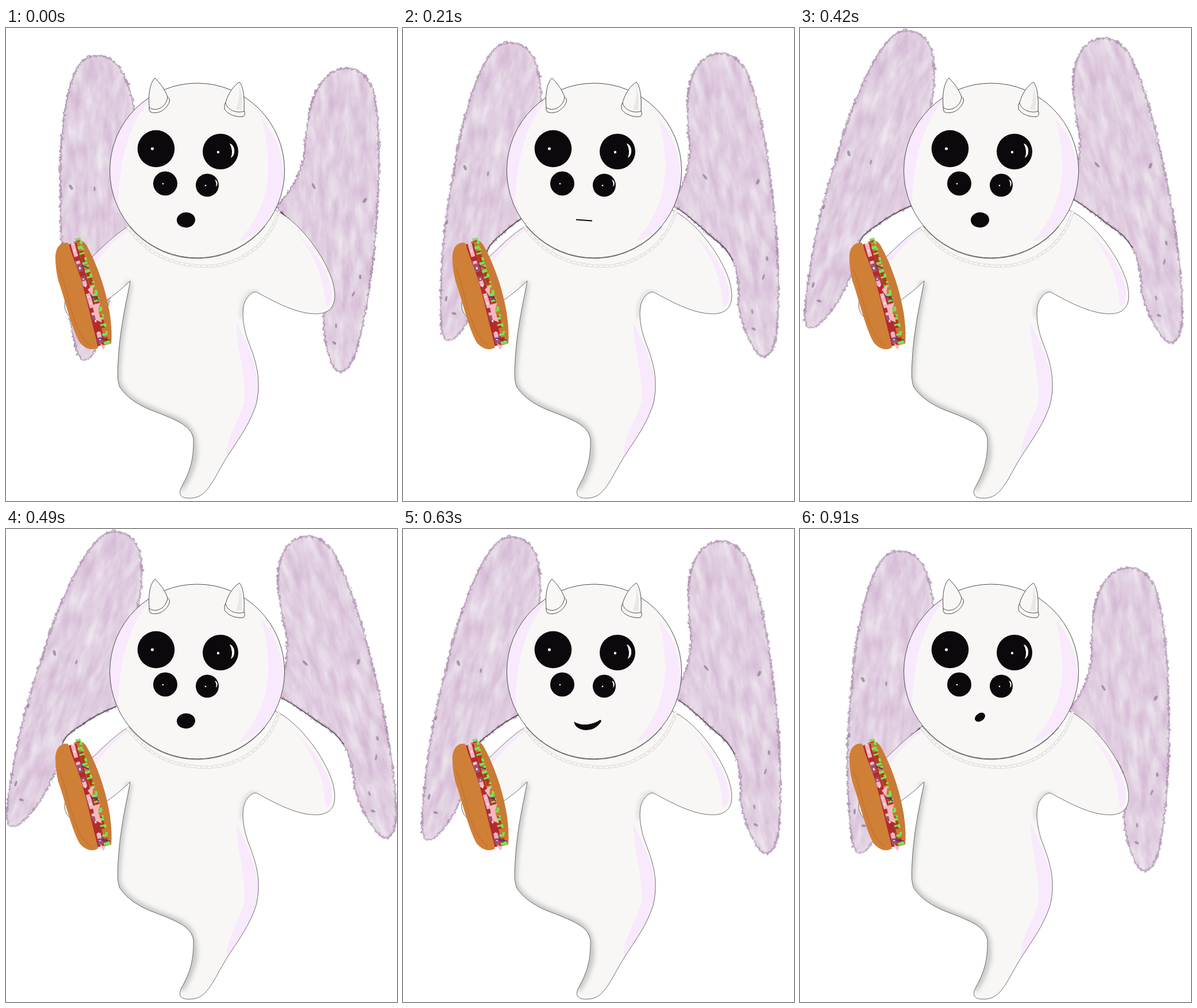
These frames come from a looping animation (680 by 823 pixels, 0.98 s). An HTML page without scripts:

```html
<!DOCTYPE html>
<html lang="en">
<head>
<meta charset="utf-8">
<title>Winged ghost with a sandwich</title>
<style>
html, body { margin: 0; width: 100%; height: 100%; overflow: hidden; background: #fff; }
svg { display: block; width: 100vw; height: 100vh; }
.skin { fill: #f8f7f5; }
.line { stroke: #4a4a4a; stroke-width: 1; }
.blush { fill: #f9e9fc; }
.ink { fill: #0b090b; }
.shine { fill: #fff; }
.none { fill: none; }
.fur { fill: #fff; stroke: #cfc6d0; stroke-width: 3; filter: url(#fur); }
.cut { fill: none; stroke: #2c262e; stroke-width: 1.1; }
.smudge { fill: #6d5a72; opacity: .55; }

/* Fourteen held poses: the flap runs out and back again */
.wing, .mouth { animation: 980ms step-end infinite; }
.left { transform-origin: 137px 557px; animation-name: flap-left; }
.right { transform-origin: 579px 578px; animation-name: flap-right; }
@keyframes flap-left {
  0%, 100% { transform: none; }
  7.14%, 92.85% { transform: translate(-31px, -14px) rotate(5.6deg); }
  14.28%, 85.71% { transform: translate(-43px, -24px) rotate(7.9deg); }
  21.42%, 78.57% { transform: translate(-55px, -34px) rotate(10.2deg); }
  28.57%, 71.42% { transform: translate(-72px, -36px) rotate(12.2deg) scaleY(1.02); }
  35.71%, 64.28% { transform: translate(-89px, -37px) rotate(14.3deg) scaleY(1.035); }
  42.85%, 57.14% { transform: translate(-114px, -56px) rotate(17.1deg) scaleY(1.03); }
  50% { transform: translate(-121px, -60px) rotate(18.4deg) scaleY(1.03); }
}
@keyframes flap-right {
  0%, 100% { transform: none; }
  7.14%, 92.85% { transform: translate(17px, -3px) rotate(-4.6deg); }
  14.28%, 85.71% { transform: translate(30px, -15px) rotate(-7.5deg); }
  21.42%, 78.57% { transform: translate(44px, -26px) rotate(-10.3deg) scaleY(1.01); }
  28.57%, 71.42% { transform: translate(46px, -30px) rotate(-10.3deg) scaleY(1.02); }
  35.71%, 64.28% { transform: translate(48px, -34px) rotate(-10.3deg) scaleY(1.04); }
  42.85%, 57.14% { transform: translate(61px, -50px) rotate(-15deg) scaleY(1.03); }
  50% { transform: translate(76px, -60px) rotate(-17.3deg) scaleY(1.03); }
}

.mouth { visibility: hidden; }
.open { animation-name: open; }
.small { animation-name: small; }
.flat { animation-name: flat; }
.smile { animation-name: smile; }
@keyframes open {
  0%, 42.85%, 100% { visibility: visible; }
  7.14%, 64.28% { visibility: hidden; }
}
@keyframes small {
  0%, 14.28%, 100% { visibility: hidden; }
  7.14%, 92.85% { visibility: visible; }
}
@keyframes flat {
  0%, 28.57%, 92.85%, 100% { visibility: hidden; }
  14.28%, 78.57% { visibility: visible; }
}
@keyframes smile {
  0%, 42.85%, 78.57%, 100% { visibility: hidden; }
  28.57%, 64.28% { visibility: visible; }
}
</style>
</head>
<body>
<svg viewBox="0 0 680 823">
  <defs>
    <!-- Brushed texture with a ragged edge -->
    <filter id="fur" color-interpolation-filters="sRGB">
      <feTurbulence type="fractalNoise" baseFrequency=".2" numOctaves="2" seed="4" result="grain"/>
      <feDisplacementMap in="SourceGraphic" in2="grain" scale="8" xChannelSelector="R" yChannelSelector="G" result="shape"/>
      <feTurbulence type="fractalNoise" baseFrequency=".07 .02" numOctaves="4" seed="11"/>
      <feColorMatrix values=".13 0 0 0 .815  .24 0 0 0 .69  .13 0 0 0 .815  0 0 0 0 1"/>
      <feBlend in2="shape" mode="multiply"/>
      <feComposite in2="shape" operator="in"/>
    </filter>
    <filter id="soft" x="-30%" width="160%"><feGaussianBlur stdDeviation="4"/></filter>
    <path id="torso" d="M213 345C190 358 165 384 148 400L104 470Q97 490 112 504C140 500 185 470 216 440
      C211 470 198 520 195 580C194 600 193 612 198 625C212 645 230 655 250 664C300 683 322 692 326 715
      C327 750 320 772 306 797C298 811 304 819 320 818C345 818 355 798 375 762C395 726 420 700 435 655
      C445 612 435 580 422 547C410 515 410 488 416 475C424 460 433 458 437 460C470 478 510 500 545 497
      C570 494 576 475 569 445C558 402 513 340 474 320L340 240Z"/>
    <circle id="head" cx="332.5" cy="248" r="152"/>
    <clipPath id="in-torso"><use href="#torso"/></clipPath>
    <clipPath id="in-head"><use href="#head"/></clipPath>
    <path id="chain" class="none" d="M212 347C240 385 275 410 335 414C395 419 455 385 474 320"/>
    <path id="filling" class="none" d="M116 375C124 410 148 470 166 552"/>
    <path id="salad" class="none" d="M125 366C134 408 160 465 175 550"/>
  </defs>

  <g class="wing left">
    <path class="fur" d="M137 578C122 577 118 545 111 505C100 440 94 380 95 300C92 200 100 130 117 85C127 57 140 48 158 48
      C182 47 198 65 209 90C220 115 225 150 229 200C232 260 236 300 244 330C225 345 208 363 195 381
      C182 395 177 405 176 418C183 440 181 460 179 472C175 515 166 545 150 568Q145 577 137 578Z"/>
    <path class="cut" d="M244 330C225 345 208 363 195 381C182 395 177 405 176 418"/>
    <g class="smudge">
      <ellipse cx="113" cy="277" rx="2.5" ry="5" transform="rotate(-35 113 277)"/>
      <ellipse cx="99" cy="376" rx="1.5" ry="4"/>
      <ellipse cx="154" cy="280" rx="1.5" ry="4"/>
      <ellipse cx="121" cy="507" rx="2" ry="5"/>
      <ellipse cx="139" cy="530" rx="4" ry="2"/>
    </g>
  </g>

  <g class="wing right">
    <path class="fur" d="M579 598C568 595 563 575 556 550C552 525 551 515 552 501C562 470 560 440 557 426
      C552 408 544 396 534 386C515 364 500 340 478 320L470 310C495 285 512 255 518 222C521 185 525 150 534 122
      C548 88 566 70 594 70C622 71 638 95 643 130C650 170 650 240 646 305C643 380 634 450 621 512
      C612 560 600 600 579 598Z"/>
    <path class="cut" d="M478 320C500 340 515 364 534 386C544 396 552 408 557 426"/>
    <g class="smudge">
      <ellipse cx="535" cy="275" rx="2" ry="6" transform="rotate(-30 535 275)"/>
      <ellipse cx="624" cy="300" rx="2.5" ry="5" transform="rotate(35 624 300)"/>
      <ellipse cx="616" cy="433" rx="2" ry="4"/>
      <ellipse cx="604" cy="463" rx="1.5" ry="5" transform="rotate(30 604 463)"/>
      <ellipse cx="571" cy="548" rx="4" ry="2" transform="rotate(35 571 548)"/>
      <ellipse cx="574" cy="518" rx="1.5" ry="4"/>
    </g>
  </g>

  <use href="#torso" class="skin"/>
  <g clip-path="url(#in-torso)">
    <path class="none" filter="url(#soft)" stroke="#bfc0bd" stroke-width="10"
      d="M214 442C206 490 193 560 193 612C200 650 260 668 295 682C325 695 328 715 327 745Q322 775 303 802"/>
    <path class="none" filter="url(#soft)" stroke="#c9c9c6" stroke-width="5" d="M437 459Q412 458 411 505"/>
    <g class="blush">
      <path d="M402 515C425 560 441 600 439 640C430 690 403 722 383 746C385 700 416 670 415 640C416 600 400 550 401 515Z"/>
      <path d="M505 355C540 390 567 430 567 465Q565 485 556 484C553 430 535 395 505 355Z"/>
      <path d="M213 347C190 360 165 385 145 402L152 414Q180 374 216 350Z"/>
    </g>
  </g>
  <use href="#torso" class="none line" opacity=".8"/>

  <g stroke-linecap="round" stroke-dasharray="5 4.5">
    <use href="#chain" stroke="#d9d8d6" stroke-width="5.5"/>
    <use href="#chain" stroke="#f8f7f5" stroke-width="3.5"/>
  </g>

  <use href="#head" class="skin"/>
  <g class="blush" clip-path="url(#in-head)">
    <path d="M252 122C212 170 197 230 195 308L160 300V120Z"/>
    <path d="M444 158C470 185 484 225 483 270C474 320 445 360 404 372C440 330 457 290 456 235Q454 190 444 158Z"/>
  </g>
  <use href="#head" class="none line"/>
  <path class="none" stroke="#777" stroke-width="1.6" d="M215 345A152 152 0 0 0 450 345"/>

  <g class="skin line" stroke-linejoin="round">
    <path d="M249 136C247 110 252 94 259 87C269 97 277 108 281 120Q286 123 284 129C278 144 262 151 251 146Q248 143 249 136Z"/>
    <path class="none" d="M249 138C260 147 279 138 281 120"/>
    <path d="M382 129C387 113 395 101 406 94C413 102 415 122 414 144Q417 150 413 154C400 156 385 150 380 141Q379 133 382 129Z"/>
    <path class="none" d="M382 130C384 142 400 149 414 145"/>
    <path d="M405 100C411 115 411 130 409 143L400 141Q408 120 405 100Z" fill="#e9e8e6" stroke="none"/>
  </g>

  <g class="ink">
    <circle cx="261" cy="210" r="32.3"/>
    <circle cx="373" cy="215" r="31"/>
    <circle cx="277" cy="270.5" r="21"/>
    <circle cx="350" cy="273.5" r="20"/>
  </g>
  <g class="shine">
    <circle cx="254.5" cy="210" r="2.5"/>
    <circle cx="369" cy="216" r="2.2"/>
    <circle cx="273" cy="271" r="1.3"/>
    <circle cx="347" cy="274" r="1.3"/>
    <path d="M389 201C399 203 400 222 391 226Q396 214 389 201Z"/>
    <path d="M363 264C369 265 369 274 365 276Q367 270 363 264Z"/>
  </g>

  <ellipse class="mouth open ink" cx="313" cy="334" rx="16" ry="13.3" transform="rotate(-5 313 334)"/>
  <ellipse class="mouth small ink" cx="313" cy="327.5" rx="9.8" ry="6.8" transform="rotate(-35 313 327.5)"/>
  <path class="mouth flat" stroke="#0b090b" stroke-width="1.8" d="M301 333.5L329 335.5"/>
  <path class="mouth smile ink" d="M298 335C306 342 326 343 343 332Q346 333 344 336C338 345 330 350 317 350C305 349 297 342 298 335Z"/>

  <g stroke-linejoin="round">
    <path fill="#c97a35" d="M118 372Q132 365 140 378C158 410 174 455 181 500Q185 530 183 549L168 553Z"/>
    <use href="#filling" stroke="#b32a2c" stroke-width="14"/>
    <use href="#filling" stroke="#a0506a" stroke-width="9" stroke-dasharray="14 22 20 9" stroke-dashoffset="5"/>
    <use href="#filling" stroke="#f4b3bd" stroke-width="7" stroke-dasharray="5 31 9 14 26 8" stroke-dashoffset="-32"/>
    <use href="#filling" stroke="#f3dfe0" stroke-width="3" stroke-dasharray="2 9 4 17"/>
    <use href="#salad" stroke="#b3361c" stroke-width="7" stroke-dasharray="22 17" stroke-dashoffset="-62"/>
    <use href="#salad" stroke="#7be05a" stroke-width="9" stroke-dasharray="4 10 5 7 3 14"/>
    <use href="#salad" stroke="#69f04e" stroke-width="4" stroke-dasharray="6 8 3 13" transform="translate(5 4)"/>
    <g class="none" stroke="#4b2490" stroke-width="1.6">
      <path d="M132 413L144 418M149 468Q158 466 161 474M161 540L181 543"/>
    </g>
    <path fill="#f7b6bf" d="M150 482L164 478L160 492L167 512L156 508ZM142 455L152 447L150 466ZM163 548L173 554L169 560Z"/>
    <path fill="#d07f37" d="M86 402C85 384 94 371 108 374C113 390 121 410 128 430C138 460 149 510 160 556
      C150 562 138 559 128 547C113 520 102 470 91 440Q86 418 86 402Z"/>
    <path class="none" stroke="#c27230" stroke-width="2" opacity=".7" d="M92 420C105 445 108 480 120 510Q130 540 148 553"/>
  </g>
</svg>
</body>
</html>
```
